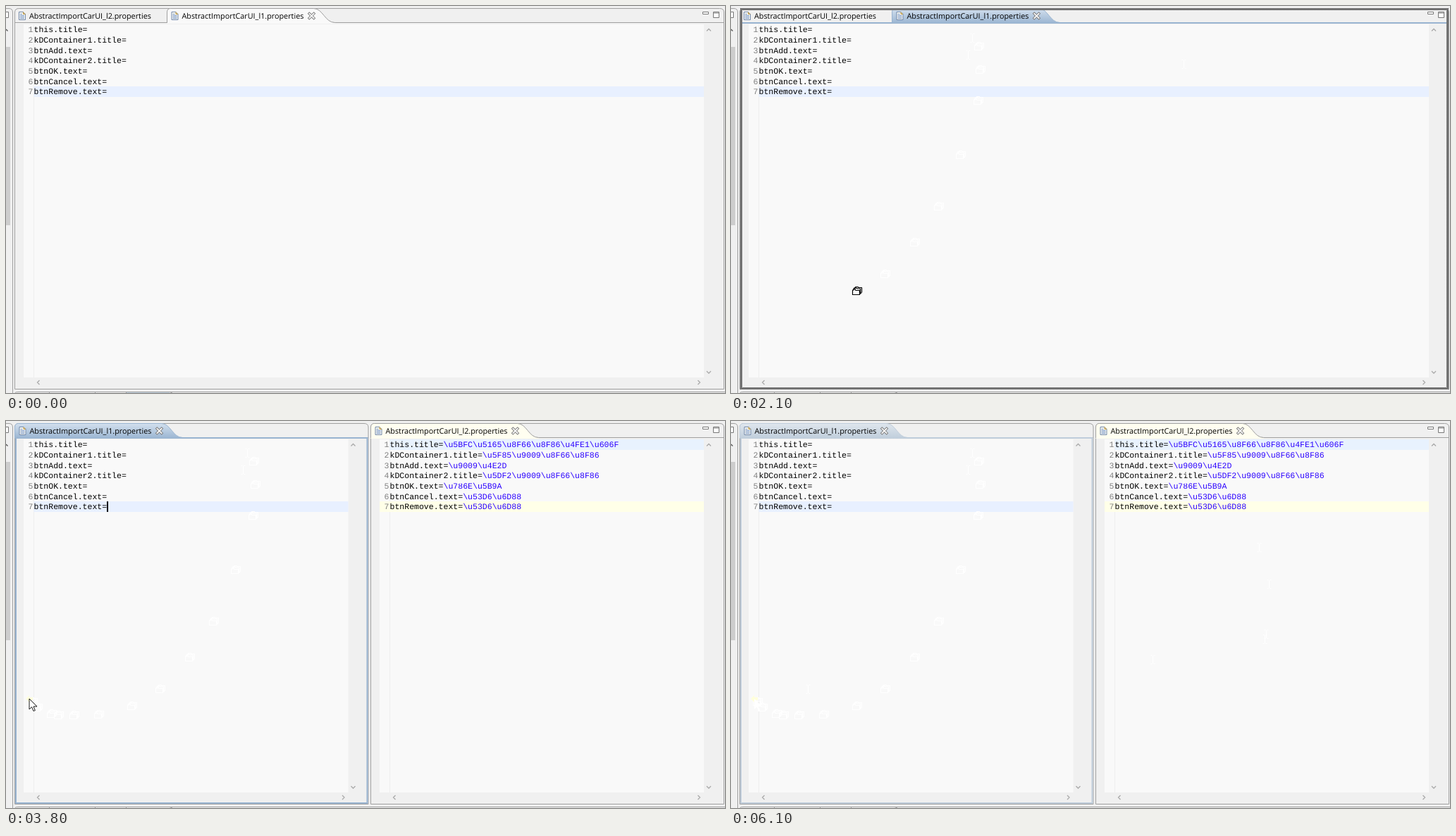
Write an HTML page that moves like this. It is 1020 by 549 pixels and loops after 6200 ms.

```html
<!DOCTYPE html>
<html lang="en">
<head>
<meta charset="utf-8">
<title>Splitting an editor</title>
<style>
  html, body { margin: 0; width: 100%; height: 100%; overflow: hidden; background: #f0f0f0; }
  svg { display: block; text-rendering: geometricPrecision; }
  .code { font: 11.53px "Liberation Mono", monospace; fill: #000; }
  .num { fill: #808080; text-anchor: end; }
  .value { fill: #2a00ff; }
  .title { font: 10.8px "Open Sans", sans-serif; fill: #000; }
  .line { fill: none; stroke: #a0a0a0; }
  .chevron { fill: none; stroke: #a9a9a9; stroke-width: 1.3; }
</style>
</head>
<body>
<svg id="stage" width="1020" height="549" viewBox="0 0 1020 549"></svg>
<script>
const LOOP = 6200;
const ROW = 14.67;
const keys = ['this.title', 'kDContainer1.title', 'btnAdd.text', 'kDContainer2.title',
  'btnOK.text', 'btnCancel.text', 'btnRemove.text'];
const codes = ['5BFC 5165 8F66 8F86 4FE1 606F', '5F85 9009 8F66 8F86', '9009 4E2D',
  '5DF2 9009 8F66 8F86', '786E 5B9A', '53D6 6D88', '53D6 6D88'];
const values = codes.map(c => c.split(' ').map(h => '\\u' + h).join(''));
const tabName = n => `AbstractImportCarUI_l${n}.properties`;

const skins = {
  plain: { tab: '#f9f9f9' },
  cream: { tab: '#fffef0' },
  focus: { tab: 'url(#focusTab)', border: '#99b4d1' },
  blur: { tab: 'url(#blurTab)', border: '#bfcddb' }
};

const rect = (x, y, w, h, fill) =>
  `<rect x="${x}" y="${y}" width="${w}" height="${h}" fill="${fill}"/>`;
const path = (d, attrs) => `<path d="${d}" ${attrs}/>`;
const line = (d, color = '#a0a0a0') => path(d, `class="line" style="stroke:${color}"`);
const chevron = d => path(d, 'class="chevron"');

function label(x, name) {
  return `<g transform="translate(${x + 6} 8)">`
    + path('M.5.5H6.5L9.5 3.5V11.5H.5Z', 'fill="#fffdf2" stroke="#6f86ab"')
    + path('M6.5.5V3.5H9.5', 'fill="#e5c878" stroke="#b8964c"')
    + path('M2 3.5H5M2 5.5H8M2 7.5H8M2 9.5H8', 'stroke="#5c80c0" stroke-width=".9"')
    + `</g><text class="title" x="${x + 21}" y="18">${name}</text>`;
}

function closeMark(x) {
  const cross = 'M-3.2-3.2L3.2 3.2M3.2-3.2L-3.2 3.2';
  return `<g transform="translate(${x} 14)">`
    + path(cross, 'stroke="#777" stroke-width="3.6" stroke-linecap="square"')
    + path(cross, 'stroke="#fafafa" stroke-width="1.8" stroke-linecap="square"') + '</g>';
}

function pane({ x, right, tab, file, skin, filled, bands }) {
  const { tab: fill, border } = skins[skin];
  const end = right - 28.5;
  const edge = `M${tab} 24V9Q${tab} 3.5 ${tab + 5} 3.5H${tab + 208}`
    + `C${tab + 221} 3.5 ${tab + 224} 23.5 ${tab + 238} 23.5`;
  let out = path(`M${x} 543.5V9Q${x} 3.5 ${x + 6} 3.5H${right - 6}Q${right} 3.5 ${right} 9V543.5Z`,
    'fill="#f0f0f0" stroke="#a0a0a0"');
  out += line(`M${x} 23.5H${right}`);
  if (border) out += `<rect x="${x + 1.5}" y="24" width="${right - x - 3}" height="518"
    fill="none" stroke="${border}" stroke-width="2"/>`;
  out += path(edge + 'V25H' + tab + 'Z', `fill="${fill}"`) + line(edge, border);
  out += label(tab, tabName(file)) + closeMark(tab + 205);
  out += rect(x + 12.5, 26, end - x - 12.5, 501, '#f9f9f9');
  out += line(`M${x + 27} 26V527`, '#efefef');
  for (const [row, color, inset = 27] of bands)
    out += rect(x + inset, Math.round(26.3 + row * ROW), end - x - inset, 15, color);
  keys.forEach((key, i) => {
    const y = 37.2 + i * ROW;
    const value = filled ? `<tspan class="value">${values[i]}</tspan>` : '';
    out += `<text class="code num" x="${x + 26}" y="${y}">${i + 1}</text>`
      + `<text class="code" x="${x + 27}" y="${y}">${key}=${value}</text>`;
  });
  const sx = right - 21.5;
  return out + chevron(`M${sx - 3} 35.5l3-3 3 3M${sx - 3} 518l3 3 3-3`)
    + chevron(`M${x + 35} 531l-3 3 3 3M${right - 37} 531l3 3-3 3`);
}

const blueRow = [6, '#e8f0ff'];
const fullView = skin => pane({ x: 12.5, right: 1018.5, tab: 228.5, file: 1, skin, bands: [blueRow] })
  + label(12, tabName(2));
const splitView = skin =>
  pane({ x: 12.5, right: 514, tab: 12.5, file: 1, skin, bands: [blueRow] })
  + pane({ x: 517.5, right: 1018.5, tab: 517.5, file: 2, skin: 'cream', filled: true,
    bands: [[0, '#e8f2fe'], [6, '#ffffe8', 12.5]] });

const surroundings =
  rect(0, 0, 1020, 549, '#f0f0f0')
  + line('M0 3.5H4Q9.5 3.5 9.5 9V549') + rect(0, 58, 6, 253, '#cdcdcd')
  + path('M0 8.5H3.5V16.5H0', 'fill="#fff" stroke="#777"')
  + path('M0 33l2.5 2.5', 'stroke="#555" stroke-width="1.3"')
  + line('M12.5 549Q13 547.5 18 547.5H1020M61.5 548V549M126.5 548V549M170.5 548V549M232 547.5l4 1.5');
const windowButtons =
  path('M988.5 8.5H996.5V11.5H988.5Z', 'fill="#fff" stroke="#777"')
  + path('M1003.5 8.5H1011.5V16.5H1003.5ZM1003.5 10H1011.5', 'fill="#fff" stroke="#777"');
const frame = (id, width) => `<rect id="${id}" x="14.5" y="4.5" width="${width}" height="538"
  fill="none" stroke="url(#dots)" stroke-width="3"/>`;

// Pointer shapes, drawn around their hot spot
const shapes = {
  beam: c => path('M-2.5-5.5H-.5M1.5-5.5H3.5M.5-5V6M-2.5 6.5H-.5M1.5 6.5H3.5',
    `fill="none" stroke="${c}"`),
  arrow: (c, ghost) => path('M0 0V15L3.6 11.7 6 17.5 8.3 16.5 6 11H11Z',
    ghost ? `fill="${c}"` : 'fill="#fff" stroke="#000" stroke-width=".9"'),
  drag: (c, ghost) => path(
    'M-3-2V-4.5L-2-5.5H1L2-4.5H6.5V2L4.5 4.5M-5-.5V-3L-4-4H-1L0-3H4.5V4M-6.5 5.5V-.5L-5.5-2H-3L-2-.5H3.5V5.5Z',
    `fill="${ghost ? 'none' : '#fff'}" stroke="${c}" stroke-width="1.2" stroke-linejoin="round"`),
  left: (c, ghost) => path('M-5 0L0-5V-2H5V2H0V5Z', `fill="${ghost ? '#ffffdc' : c}"`),
  none: () => ''
};

// [time, shape, x, y]
const pointer = [
  [0, 'none', 0, 0],
  [300, 'beam', 642, 82], [400, 'beam', 336, 69], [500, 'beam', 342, 45],
  [600, 'beam', 338, 32], [700, 'beam', 337, 27], [800, 'arrow', 337, 18], [900, 'arrow', 337, 15],
  [1200, 'drag', 343, 18], [1300, 'drag', 349, 30], [1400, 'drag', 352, 57],
  [1500, 'drag', 354, 90], [1600, 'drag', 351, 134], [1700, 'drag', 326, 211],
  [1800, 'drag', 295, 284], [1900, 'drag', 261, 335], [2000, 'drag', 219, 380],
  [2100, 'drag', 179, 404], [2200, 'drag', 132, 416], [2300, 'drag', 97, 417],
  [2400, 'drag', 75, 417], [2500, 'drag', 65, 415], [2800, 'drag', 45, 406], [2900, 'drag', 38, 398],
  [3100, 'left', 33, 394], [3800, 'arrow', 33, 394],
  [4000, 'beam', 109, 380], [4100, 'beam', 598, 338], [4200, 'beam', 757, 309],
  [4300, 'beam', 759, 302], [4400, 'beam', 763, 231], [4600, 'beam', 749, 179],
  [4900, 'beam', 850, 122], [5000, 'arrow', 1007, 73], [5100, 'none', 0, 0]
];
const caretOn = [[1200, 1700], [2200, 2700], [3200, 4200], [4800, 5200], [5700, 6100]];

const place = ([, shape, x, y], ghost) =>
  `<g transform="translate(${x} ${y})">${shapes[shape](ghost ? '#fff' : '#000', ghost)}</g>`;
const leavesTrace = ([, shape, x, y]) => shape !== 'none' && y > 40 && x < 800;
const gradient = (id, top, bottom) => `<linearGradient id="${id}" x2="0" y2="1">
  <stop stop-color="${top}"/><stop offset="1" stop-color="${bottom}"/></linearGradient>`;

document.getElementById('stage').innerHTML = `<defs>
  ${gradient('focusTab', '#d3e0ee', '#99b4d1')}${gradient('blurTab', '#dfe6ed', '#bfcddb')}
  <pattern id="dots" width="2" height="2" patternUnits="userSpaceOnUse">
    ${rect(0, 0, 2, 2, '#b4b4b4')}${rect(0, 0, 1, 1, '#303030')}${rect(1, 1, 1, 1, '#303030')}
  </pattern></defs>`
  + surroundings
  + `<g id="idle">${rect(171, 548, 61, 1, '#c3d3df')}${fullView('plain')}</g>
  <g id="active">${fullView('focus')}</g>
  <g id="split">${splitView('focus')}</g>
  <g id="rest">${splitView('blur')}</g>`
  + windowButtons
  + `<g id="seam">${rect(513, 26, 2, 88, '#fff')}${rect(513, 129, 2, 398, '#fff')}</g>
  <g id="traces"></g>`
  + frame('wide', 1002) + frame('half', 499)
  + rect(143, 114, 2, 15, '#000').replace('<rect', '<rect id="caret"')
  + '<g id="pointer"></g>';

const $ = id => document.getElementById(id);
const show = (id, on) => { $(id).style.display = on ? '' : 'none'; };
let last = -1;

function draw(now) {
  const t = now % LOOP;
  const within = (a, b) => t >= a && t < b;
  show('idle', t < 1000);
  show('active', within(1000, 3800));
  show('split', within(3800, 6100));
  show('rest', t >= 6100);
  show('wide', within(1200, 3100));
  show('half', within(3100, 3700));
  show('seam', within(3700, 3800));
  show('caret', caretOn.some(([a, b]) => within(a, b)));
  const step = pointer.filter(p => p[0] <= t).length - 1;
  if (step !== last) {
    last = step;
    $('pointer').innerHTML = place(pointer[step]);
    $('traces').innerHTML = pointer.slice(0, step).filter(leavesTrace).map(p => place(p, true)).join('');
  }
}

function tick() {
  draw(performance.now());
  requestAnimationFrame(tick);
}
tick();
</script>
</body>
</html>
```
